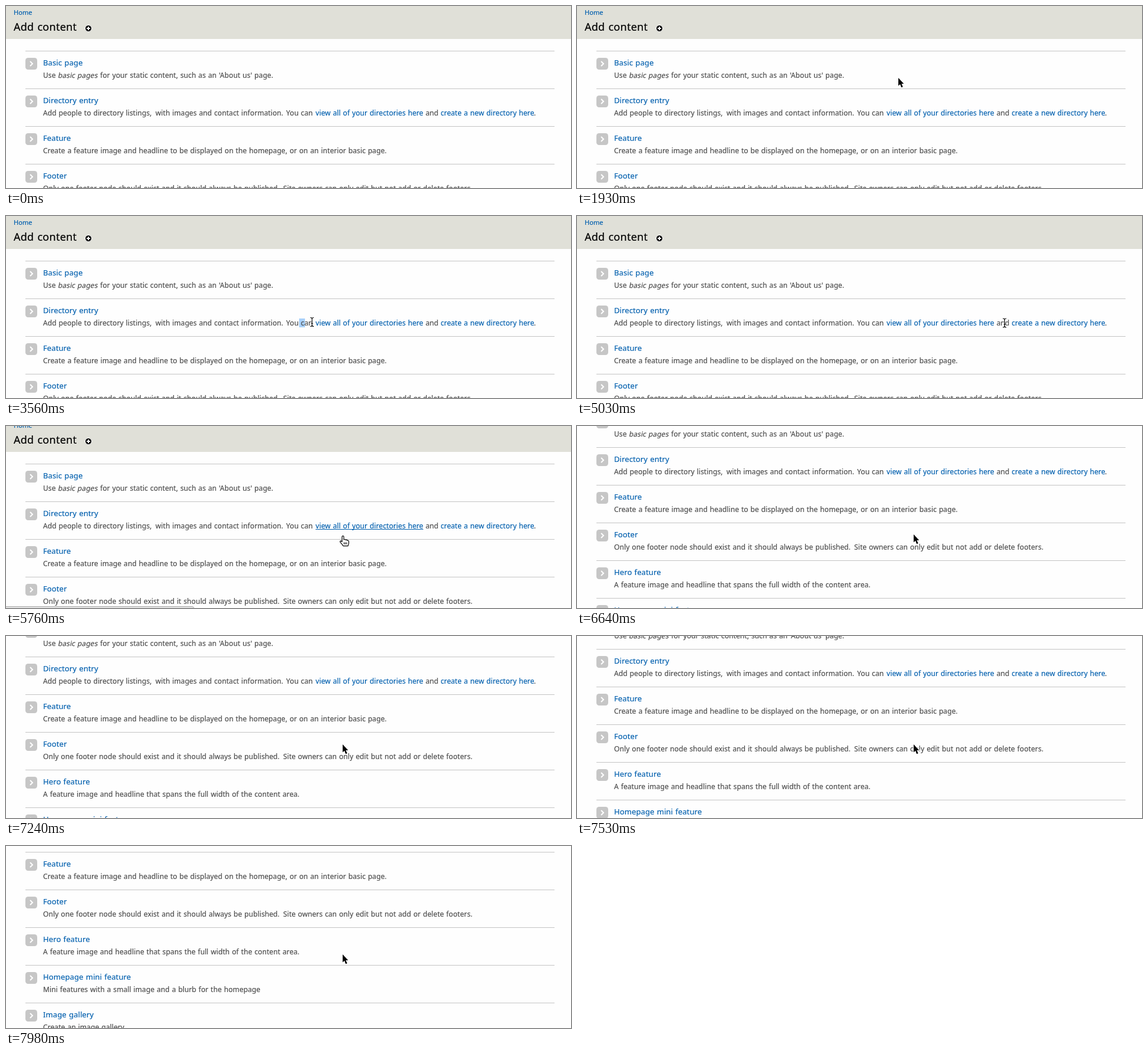
Write an HTML page that moves like this. It is 960x309 px and loops after 8 s.

```html
<!DOCTYPE html>
<html lang="en">
<head>
<meta charset="utf-8">
<title>Add content</title>
<style>
html, body { margin: 0; width: 100%; height: 100%; overflow: hidden; background: #fefefe; }
svg { display: block; width: 100%; height: 100%; }
text {
  font: 12px "Noto Sans", "Open Sans", sans-serif; letter-spacing: .008em; word-spacing: .057em;
  color: #4c4c4c; fill: currentColor; stroke: currentColor; stroke-width: .18; white-space: pre;
}
text.head { font-size: 13px; }
text.link { color: #005fae; }
text.crumb { font-size: 11px; }
text.title { font-size: 18px; letter-spacing: .015em; color: #000; }
</style>
</head>
<body>
<svg id="stage" viewBox="0 0 960 309">
  <g id="page">
    <rect width="960" height="56" fill="#e0e0d8"/>
    <text class="crumb link" x="13" y="15">Home</text>
    <text class="title" x="13" y="42">Add content</text>
    <circle cx="140" cy="38" r="5.5" stroke="#fff"/>
    <path d="M137 38h6M140 35v6" stroke="#fff" stroke-width="2"/>
    <rect id="mark" x="498" y="174" width="10" height="15" fill="#a9d1fb"/>
    <g id="list"></g>
    <path id="line" d="M526 187.5H709" stroke="#005fae"/>
  </g>
  <path id="status" d="M-1 310V306.5H316Q319.5 306.5 319.5 310" fill="#e2e2e2" stroke="#aaa"/>
  <path id="arrow" d="M0 0V13.5L3 10.8L5.2 16.2L7.7 15.2L5.4 10H9.3Z" stroke="#fff" stroke-width="2" paint-order="stroke"/>
  <g id="beam" fill="none">
    <path id="bar" d="M-3-7.5Q0-7.5 0-5.5Q0-7.5 3-7.5M0-6V6M-3 7.5Q0 7.5 0 5.5Q0 7.5 3 7.5M-1.5 2.5H1.5" stroke="#fff" stroke-width="2.6"/>
    <path d="M-3-7.5Q0-7.5 0-5.5Q0-7.5 3-7.5M0-6V6M-3 7.5Q0 7.5 0 5.5Q0 7.5 3 7.5M-1.5 2.5H1.5" stroke="#000" stroke-width="1.2"/>
  </g>
  <g id="hand" fill="#fff" stroke="#000" stroke-width="1.2" stroke-linejoin="round">
    <path d="M-2 9.5V1.3Q-2-.3-.5-.3T1 1.3V6Q3.2 4.8 4 6.5Q6 5.6 6.8 7.3Q9.4 6.8 9.4 9.5V12Q9 14 8 16.7H0Q-1.5 14-5 10.3Q-6 8-4 8Z"/>
    <path d="M1.4 10.5V14M3.6 10.5V14M5.8 10.5V14" stroke-width="1"/>
  </g>
</svg>
<script>
const LOOP = 8000;
const $ = id => document.getElementById(id);

// Each item: heading, then description runs as [x, text, class]
const items = [
  ["Basic page", [63, "Use"], [88, "basic pages", "slant"],
    [160, "for your static content, such as an 'About us' page."]],
  ["Directory entry",
    [63, "Add people to directory listings,"], [254, "with images and contact information."],
    [476, "You can"], [526, "view all of your directories here", "link"], [713, "and"],
    [738.5, "create a new directory here", "link"], [897, "."]],
  ["Feature", [63, "Create a feature image and headline to be displayed on the homepage, or on an interior basic page."]],
  ["Footer", [63, "Only one footer node should exist and it should always be published."],
    [471, "Site owners can only edit but not add or delete footers."]],
  ["Hero feature", [63, "A feature image and headline that spans the full width of the content area."]],
  ["Homepage mini feature", [63, "Mini features with a small image and a blurb for the homepage"]],
  ["Image gallery", [63, "Create an image gallery"]]
];

function run([x, text, cls = ""]) {
  const slant = cls === "slant" ? " skewX(-11)" : "";
  return `<text class="${cls}" transform="translate(${x} 46)${slant}">${text}</text>`;
}

$("list").innerHTML = items.map(([head, ...runs], i) => `
  <g transform="translate(0 ${76 + 64 * i})">
    <path d="M33 .5H932" stroke="#c4c4c4"/>
    <rect x="33" y="12" width="20" height="20" rx="4.5" fill="#c6c6c6"/>
    <path d="M41 18l4 4l-4 4" fill="none" stroke="#fff" stroke-width="2"/>
    <text class="head link" x="63" y="25">${head}</text>
    ${runs.map(run).join("")}
  </g>`).join("");

// Pointer steps: time, shape, x, y
const pointer = [
  [0, ""], [1050, "arrow", 162, 1], [1200, "arrow", 180, 18],
  [1490, "arrow", 222, 42], [1640, "arrow", 335, 78], [1780, "arrow", 455, 106],
  [1930, "arrow", 546, 122], [2080, "arrow", 613, 148], [2230, "arrow", 588, 167],
  [2380, "arrow", 545, 180], [2530, "arrow", 515, 185], [2670, "arrow", 507, 185],
  [3120, "arrow", 503, 185], [3270, "beam", 498, 184], [3560, "beam", 520, 180],
  [3710, "hand", 552, 180], [3850, "hand", 594, 180], [4000, "hand", 634, 180],
  [4150, "hand", 668, 181], [4300, "hand", 697, 181], [4440, "beam", 721, 181],
  [4590, "beam", 733, 181], [4730, "beam", 732, 181], [4880, "beam", 729, 181],
  [5030, "beam", 726.5, 181.5], [5170, "hand", 700, 182], [5320, "hand", 655, 184],
  [5470, "hand", 612, 186], [5620, "hand", 583, 187], [5760, "hand", 573, 187],
  [6640, "arrow", 572, 184]
];

// Scroll steps: time, offset
const scroll = [
  [0, 0], [5760, 12], [5910, 50], [6050, 81], [6200, 97], [6350, 104],
  [7240, 105], [7390, 118], [7540, 142], [7690, 166], [7830, 184], [7980, 194]
];

const stepAt = (steps, t) => steps.findLast(s => s[0] <= t);
const show = (id, on) => $(id).setAttribute("visibility", on ? "visible" : "hidden");

function draw(t) {
  const [, shape, x, y] = stepAt(pointer, t);
  for (const id of ["arrow", "beam", "hand"]) show(id, id === shape);
  if (shape) $(shape).setAttribute("transform", `translate(${x} ${y})`);
  $("page").setAttribute("transform", `translate(0 ${-stepAt(scroll, t)[1]})`);

  const hover = shape === "hand";
  show("line", hover);
  show("status", hover);
  show("mark", t >= 3560 && t < 3710);
}

const start = performance.now();
function tick() {
  draw((performance.now() - start) % LOOP);
  requestAnimationFrame(tick);
}
tick();
</script>
</body>
</html>
```
